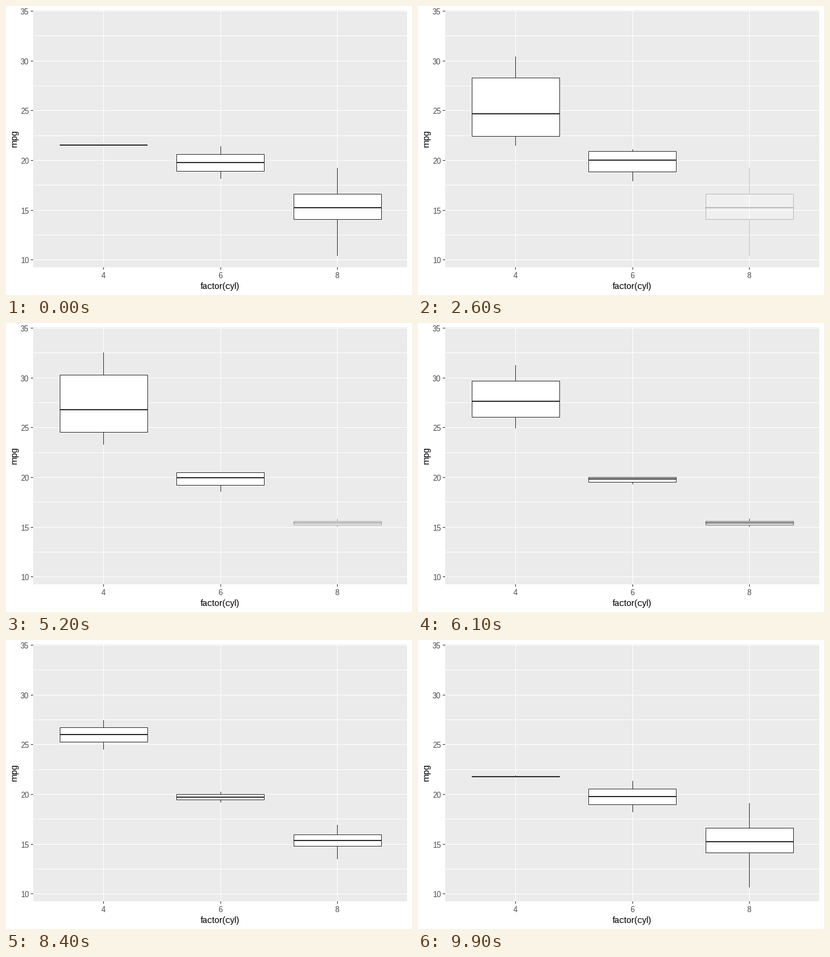
Recreate the animation shown at these times as a matplotlib script. Size 672 by 480 pixels, loop 10 s.

```python
import math

import matplotlib.pyplot as plt
import numpy as np
from matplotlib.animation import FuncAnimation
from matplotlib.patches import Rectangle

plt.rcParams["font.family"] = "Liberation Sans"
plt.rcParams["text.hinting"] = "native"
plt.rcParams["text.hinting_factor"] = 1

W, H, DPI = 672, 480, 96
PX = 72 / DPI                     # one pixel in points
LEFT, RIGHT, TOP, BOTTOM = 45.6, 664.67, 7.333, 434.448
Y_MAX, Y_SPAN = 35.075, 25.85
STEP = (RIGHT - LEFT) / 3.2       # distance between categories
INK, LABEL, PANEL = "#333333", "#4D4D4D", "#EBEBEB"
TICK_SIZE, TITLE_SIZE = 12.6, 15.4

# Readings per category (4, 6, 8) in each of the three states.
STATES = [
    [[21.5], [21.4, 18.1],
     [18.7, 14.3, 16.4, 17.3, 15.2, 10.4, 10.4, 14.7, 15.5, 15.2, 13.3, 19.2]],
    [[22.8, 24.4, 22.8, 32.4, 30.4, 33.9, 27.3, 21.4],
     [21, 21, 19.2, 17.8], None],
    [[26, 30.4], [19.7], [15.8, 15.0]],
]
FRAMES = 100
MOVES = [(8, 25), (42, 25), (76, 24)]   # start and length of each transition


def row(v):
    return math.floor(TOP + (Y_MAX - v) * (BOTTOM - TOP) / Y_SPAN)


def col(k):
    return math.floor(LEFT + (k - 0.4) * STEP)


def five(values):
    return None if values is None else np.percentile(values, [0, 25, 50, 75, 100])


STATS = [[five(values) for values in state] for state in STATES]

fig = plt.figure(figsize=(W / DPI, H / DPI), dpi=DPI, facecolor="white")
ax = fig.add_axes([0, 0, 1, 1])
ax.set_xlim(0, W)
ax.set_ylim(H, 0)
ax.axis("off")


def bar(x0, y0, x1, y1, color, z=1):
    patch = Rectangle((x0, y0), x1 - x0, y1 - y0, fc=color, lw=0,
                      antialiased=False, zorder=z)
    return ax.add_patch(patch)


def label(x, y, text, px, color, ha="center", va="baseline", rotation=0):
    ax.text(x, y, text, fontsize=px * PX, color=color, ha=ha, va=va,
            rotation=rotation)


def draw_axes():
    l, r, t, b = (math.floor(v) for v in (LEFT, RIGHT, TOP, BOTTOM))
    bar(l, t, r, b, PANEL)
    for v in np.arange(10, 35.1, 2.5):
        y = row(v)
        bar(l, y, r, y + 1, "white")
        if v % 5 == 0:
            bar(l - 4, y, l, y + 1, INK)
            label(24, y + 6, f"{v:.0f}", TICK_SIZE, LABEL, ha="left")
    for k, name in enumerate("468", 1):
        x = col(k)
        bar(x, t, x + 1, b, "white")
        bar(x, b, x + 1, b + 4, INK)
        label(x, 452, name, TICK_SIZE, LABEL)
    label(354.3, 470, "factor(cyl)", TITLE_SIZE, "black")
    label(21, 219, "mpg", TITLE_SIZE, "black", "right", "center", 90)


class Box:
    def __init__(self, k):
        self.x0, self.x1, self.mid = col(k - 0.375), col(k + 0.375), col(k)
        self.upper = bar(0, 0, 0, 0, INK, 3)
        self.lower = bar(0, 0, 0, 0, INK, 3)
        self.body = Rectangle((0, 0), 1, 1, fc="white", ec=INK, lw=PX,
                              snap=False, zorder=4)
        ax.add_patch(self.body)
        self.median = bar(0, 0, 0, 0, INK, 5)
        self.parts = [self.upper, self.lower, self.body, self.median]

    def set(self, stats, alpha):
        low, q1, med, q3, high = (row(v) for v in stats)
        width = self.x1 - self.x0
        self.upper.set_bounds(self.mid, high, 1, q3 - high)
        self.lower.set_bounds(self.mid, q1 + 1, 1, max(0, low - q1 - 1))
        self.body.set_bounds(self.x0 + 0.5, q3 + 0.5, width, q1 - q3)
        self.median.set_bounds(self.x0, med - 1, width, 2)
        self.upper.set_visible(high < q3)
        self.lower.set_visible(low > q1 + 1)
        for part in self.parts:
            part.set_alpha(alpha)


def blend(a, b, t):
    """Stats and opacity between two states; a missing box fades in place."""
    if a is None:
        return b, t
    if b is None:
        return a, 1 - t
    return a + (b - a) * t, 1


def update(n):
    i, t = 0, 0.0
    for k, (start, length) in enumerate(MOVES):
        if n >= start:
            i, t = k, min(1.0, (n - start) / length)
    for box, a, b in zip(boxes, STATS[i], STATS[(i + 1) % 3]):
        box.set(*blend(a, b, t))
    return [part for box in boxes for part in box.parts]


draw_axes()
boxes = [Box(k) for k in (1, 2, 3)]
anim = FuncAnimation(fig, update, frames=FRAMES, interval=100, repeat=True,
                     repeat_delay=0, init_func=lambda: update(0))
plt.show()
```
